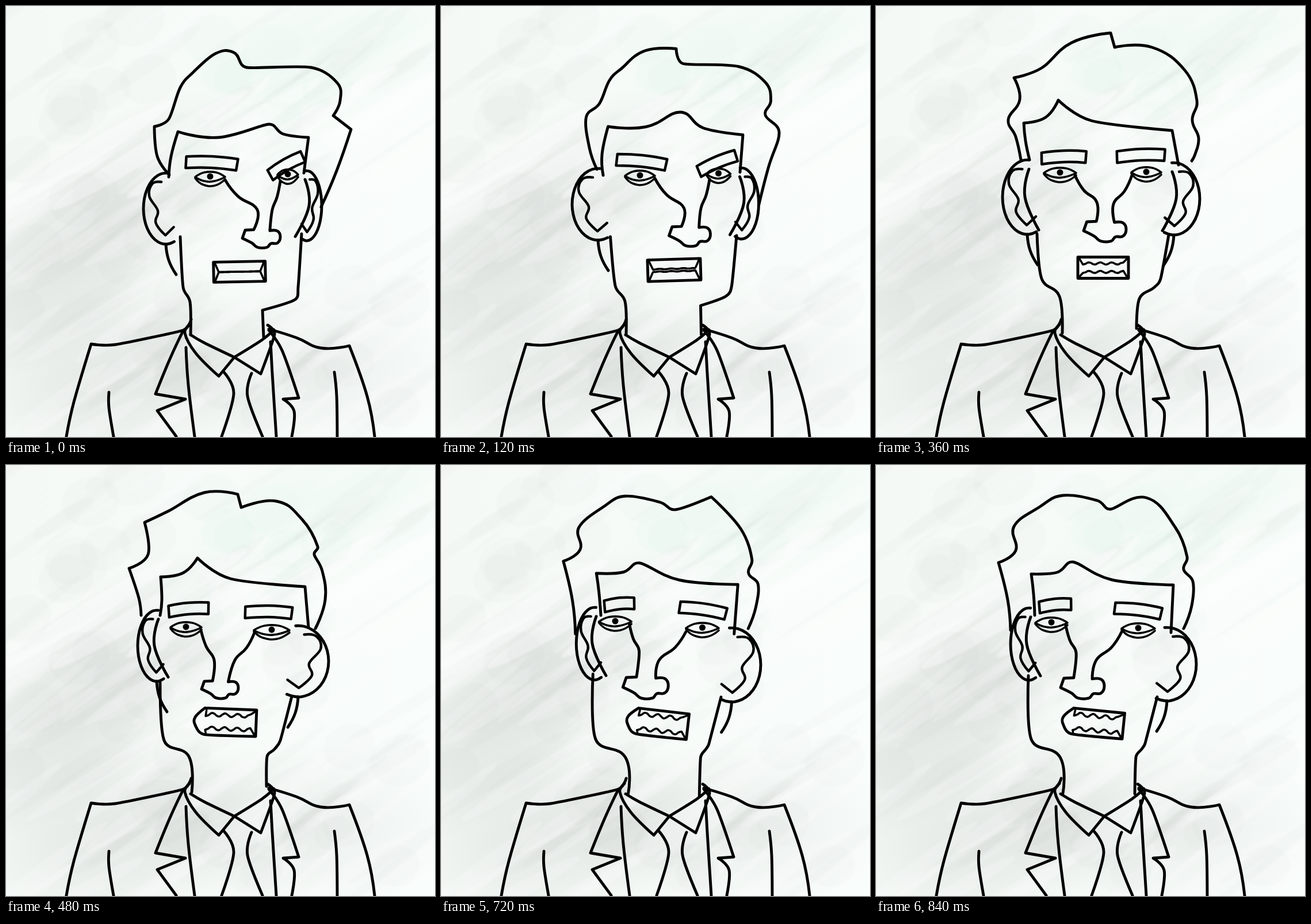
Animation of 746x751 px, one loop 960 ms. Source, as an HTML page with a canvas:

```html
<!DOCTYPE html>
<html lang="en">
<head>
<meta charset="utf-8">
<title>Talking head</title>
<style>
html, body { margin: 0; width: 100%; height: 100%; overflow: hidden; background: #f7faf8; }
canvas { display: block; }
</style>
</head>
<body>
<canvas id="stage" width="746" height="751"></canvas>
<script>
const W = 746, H = 751, STEP = 120;
const ctx = document.getElementById('stage').getContext('2d');

// Outlines are x, y key points. Features:
// ear [x, y, rx, ry], brow [x, y, width, tilt], eye [x, y, width],
// nose [x, y, half width], mouth [x, y, width, height, tilt, left bulge, teeth gap].
// Ears, cheeks and napes list the left side first.
const right = {
  hair: [284, 294, 263, 262, 258, 210, 283, 197, 303, 142, 325, 116, 364, 83, 396, 81, 418, 107, 530, 107, 576, 134, 581, 165, 569, 191, 600, 215, 575, 287, 548, 350],
  fringe: [283, 298, 287, 262, 299, 219, 370, 229, 457, 206, 482, 223, 526, 229, 518, 291],
  jawL: [303, 402, 308, 490, 320, 516, 321, 573],
  jawR: [514, 397, 508, 490, 502, 512, 446, 530, 448, 577],
  ears: [[278, 353, 39, 62], [523, 348, 26, 61]], cheeks: [0, 1], napes: [1, 0],
  brows: [[358, 274, 90, 0.06], [488, 278, 66, -0.5]],
  eyes: [[355, 298, 52], [490, 294, 36]],
  bridge: [381, 303, 437, 355, 463, 355, 477, 305], nose: [444, 403, 33],
  mouth: [406, 463, 90, 35, -0.02, 0, 0]
};
const front = {
  hair: [258, 275, 253, 232, 247, 177, 268, 143, 283, 117, 305, 100, 345, 73, 422, 68, 424, 94, 505, 104, 552, 132, 566, 165, 559, 189, 576, 225, 563, 278, 557, 345],
  fringe: [281, 292, 273, 255, 282, 201, 343, 192, 375, 164, 430, 202, 524, 220, 522, 288],
  jawL: [286, 402, 298, 485, 320, 514, 323, 570],
  jawR: [514, 403, 503, 485, 488, 500, 457, 514, 457, 568],
  ears: [[268, 338, 51, 63], [522, 340, 34, 63]], cheeks: [0, 1], napes: [1, 1],
  brows: [[340, 270, 84, 0.17], [474, 270, 76, -0.28]],
  eyes: [[337, 294, 52], [475, 291, 48]],
  bridge: [363, 298, 408, 349, 441, 350, 457, 299], nose: [421, 394, 39],
  mouth: [405, 457, 94, 40, -0.04, 0, 0.12]
};
const frontLeft = {
  hair: [252, 268, 243, 228, 230, 198, 250, 163, 240, 125, 288, 108, 340, 64, 408, 47, 415, 72, 480, 72, 537, 112, 558, 165, 550, 199, 561, 230, 555, 258, 549, 270],
  fringe: [267, 268, 260, 235, 257, 204, 295, 194, 317, 164, 375, 200, 515, 217, 526, 277],
  jawL: [280, 397, 288, 475, 319, 506, 324, 570],
  jawR: [509, 399, 495, 475, 483, 491, 458, 510, 453, 562],
  ears: [[263, 333, 43, 65], [518, 336, 45, 63]], cheeks: [1, 1], napes: [1, 1],
  brows: [[327, 264, 78, -0.02], [461, 261, 84, -0.03]],
  eyes: [[320, 291, 56], [470, 290, 52]],
  bridge: [346, 295, 384, 342, 413, 345, 445, 295], nose: [398, 390, 37],
  mouth: [395, 456, 88, 37, 0, 0, 0.2]
};
const left = {
  hair: [235, 262, 231, 232, 214, 180, 247, 156, 241, 100, 283, 80, 345, 48, 403, 51, 409, 74, 470, 63, 515, 95, 542, 142, 536, 156, 550, 185, 555, 235, 538, 285],
  fringe: [268, 262, 271, 235, 269, 195, 308, 188, 333, 162, 390, 198, 520, 212, 526, 283],
  jawL: [268, 378, 275, 480, 318, 508, 323, 570],
  jawR: [497, 403, 477, 480, 467, 495, 454, 508, 453, 560],
  ears: [[262, 315, 33, 62], [508, 342, 53, 62]], cheeks: [1, 0], napes: [1, 1],
  brows: [[318, 252, 70, -0.07], [457, 257, 82, 0.03]],
  eyes: [[313, 283, 54], [462, 288, 62]],
  bridge: [339, 288, 362, 340, 398, 340, 432, 292], nose: [372, 389, 32],
  mouth: [386, 448, 98, 46, 0.04, 8, 0.26]
};
const farLeft = {
  hair: [234, 288, 229, 235, 213, 170, 243, 149, 240, 107, 283, 74, 325, 53, 385, 62, 408, 77, 470, 57, 520, 108, 541, 160, 535, 182, 551, 203, 549, 245, 535, 285],
  fringe: [276, 262, 274, 225, 270, 190, 315, 187, 343, 169, 410, 200, 517, 209, 513, 292],
  jawL: [265, 367, 270, 478, 320, 509, 325, 572],
  jawR: [489, 404, 468, 485, 462, 495, 452, 509, 450, 573],
  ears: [[266, 312, 32, 63], [506, 347, 51, 64]], cheeks: [1, 0], napes: [0, 1],
  brows: [[312, 245, 56, -0.08], [456, 254, 82, 0.13]],
  eyes: [[305, 275, 56], [456, 285, 58]],
  bridge: [330, 280, 348, 327, 383, 340, 427, 291], nose: [359, 386, 38],
  mouth: [382, 450, 97, 45, 0.1, 8, 0.28]
};
const suit = [
  [105, 750, 118, 690, 148, 589, 190, 590, 308, 565, 322, 546],
  [641, 750, 628, 680, 597, 592, 548, 596, 505, 578, 457, 563],
  [179, 673, 179, 700, 187, 750],
  [571, 638, 575, 680, 576, 750],
  [308, 566, 285, 615, 260, 676, 312, 685, 263, 705, 296, 750],
  [457, 565, 480, 600, 509, 683, 482, 685, 501, 706, 497, 750],
  [313, 595, 317, 660, 328, 750],
  [460, 585, 463, 640, 470, 750],
  [319, 555, 311, 570, 330, 605, 370, 645, 397, 612, 345, 587, 321, 573],
  [455, 556, 467, 572, 443, 641, 397, 612, 445, 582, 466, 564],
  [378, 637, 396, 675, 375, 750],
  [427, 640, 420, 680, 446, 750]
];

const lerp = (a, b, k) => a + (b - a) * k;
const pairs = flat => Array.from({ length: flat.length / 2 }, (_, i) => flat.slice(2 * i, 2 * i + 2));

function blend(a, b, k) {
  if (typeof a === 'number') return lerp(a, b, k);
  if (Array.isArray(a)) return a.map((v, i) => blend(v, b[i], k));
  return Object.fromEntries(Object.keys(a).map(key => [key, blend(a[key], b[key], k)]));
}

// Smooth line through the points; sharp turns stay corners.
function stroke(pts, width = 4.9) {
  const tangents = pts.map(([x, y], i) => {
    const a = pts[i - 1], b = pts[i + 1];
    if (!a || !b) return [0, 0];
    const ux = x - a[0], uy = y - a[1], vx = b[0] - x, vy = b[1] - y;
    const u = Math.hypot(ux, uy), v = Math.hypot(vx, vy);
    if ((ux * vx + uy * vy) / (u * v) < 0.4) return [0, 0];
    const reach = Math.min(u, v) / (u + v) * 0.7;
    return [(ux + vx) * reach, (uy + vy) * reach];
  });
  ctx.beginPath();
  ctx.moveTo(...pts[0]);
  for (let i = 1; i < pts.length; i++) {
    const [p, q, s, t] = [pts[i - 1], pts[i], tangents[i - 1], tangents[i]];
    ctx.bezierCurveTo(p[0] + s[0] / 1.5, p[1] + s[1] / 1.5, q[0] - t[0] / 1.5, q[1] - t[1] / 1.5, ...q);
  }
  ctx.lineWidth = width;
  ctx.stroke();
}

// Maps local points into a turned, scaled frame.
const place = (x, y, sx, sy, tilt, pts) => {
  const c = Math.cos(tilt), s = Math.sin(tilt);
  return pts.map(([u, v]) => [x + u * sx * c - v * sy * s, y + u * sx * s + v * sy * c]);
};

function drawEar([x, y, rx, ry], side, cheek, nape) {
  const put = pts => place(x, y, side * rx, ry, 0, pts);
  const rim = Array.from({ length: 13 }, (_, i) => lerp(-1.65, 1.95, i / 12));
  stroke(put(rim.map(a => [Math.cos(a), Math.sin(a)])));
  stroke(put(pairs([0.2, -0.75, 0.6, -0.7, 0.74, -0.35, 0.36, 0.06, 0.45, 0.4, 0.02, 0.75, -0.35, 0.52])), 4.4);
  if (cheek) stroke([[x - side * 3, y - ry * 0.75], [x + side * 4, y], [x - side * 20, y + ry * 0.88]]);
  if (nape) stroke([[x, y + ry], [x - side * 5, y + ry + 28], [x - side * 18, y + ry + 53]]);
}

function drawBrow([x, y, width, tilt]) {
  stroke(place(x, y, width / 2, 10, tilt, pairs([-1, -0.9, 0, -1.2, 1, -1, 0.95, 1, 0, 0.8, -1, 1.1, -1, -0.9])), 4.5);
}

function drawEye([x, y, width]) {
  const r = width / 2;
  stroke([[x - r, y], [x - r * 0.4, y - 8], [x + r * 0.4, y - 8], [x + r, y], [x + r * 0.3, y + 7], [x - r * 0.4, y + 7], [x - r, y]], 3.6);
  stroke([[x - r, y + 2], [x - r * 0.5, y + 13], [x + r * 0.3, y + 15], [x + r, y + 4]], 3.6);
  ctx.beginPath();
  ctx.arc(x, y - 1, 5.5, 0, 7);
  ctx.fill();
}

function drawNose(bridge, [x, y, r]) {
  const [eyeL, topL, topR, eyeR] = pairs(bridge);
  const bend = (a, b) => [lerp(a[0], b[0], 0.4), lerp(a[1], b[1], 0.55)];
  const tip = pairs([-0.4, -0.4, -0.85, -0.38, -1, 0.05, -0.5, 0.3, -0.2, 0.53, 0.3, 0.53, 0.5, 0.33, 0.85, 0.3, 1, -0.02, 0.85, -0.33, 0.45, -0.35]);
  stroke([eyeL, bend(eyeL, topL), topL, ...place(x, y, r, r, 0, tip), topR, bend(eyeR, topR), eyeR]);
}

function drawMouth([x, y, width, height, tilt, bulge, gap]) {
  const put = pts => place(x, y, width, height, tilt, pts);
  const b = bulge / width;
  stroke(put([[-0.5 + b, -0.5], [0.5, -0.5], [0.5, 0.5], [-0.5 + b, 0.5], [-0.5 - b, 0.15], [-0.5 - b, -0.15], [-0.5 + b, -0.5]]));
  for (const row of [-1, 1]) {
    const teeth = Array.from({ length: 17 }, (_, i) => {
      const u = lerp(-0.4, 0.4, i / 16);
      return [u, row * gap + Math.sin(u * 28) * gap * 0.25];
    });
    stroke(put([[-0.47 + b, row * 0.43], ...teeth, [0.47, row * 0.43]]), 3.6);
  }
}

function drawHead(pose) {
  for (const outline of ['hair', 'fringe', 'jawL', 'jawR']) stroke(pairs(pose[outline]));
  pose.ears.forEach((ear, i) => drawEar(ear, i ? 1 : -1, pose.cheeks[i] > 0.5, pose.napes[i] > 0.5));
  pose.brows.forEach(drawBrow);
  pose.eyes.forEach(drawEye);
  drawNose(pose.bridge, pose.nose);
  drawMouth(pose.mouth);
}

function paintBackdrop() {
  const canvas = document.createElement('canvas');
  canvas.width = W; canvas.height = H;
  const g = canvas.getContext('2d');
  let seed = 11;
  const rnd = (a, b) => lerp(a, b, (seed = seed * 16807 % 2147483647) / 2147483647);
  const grey = a => `rgba(120,126,122,${a})`;
  const green = a => `rgba(165,222,190,${a})`;
  const white = a => `rgba(255,255,255,${a})`;

  const base = g.createLinearGradient(0, 0, W, 0);
  base.addColorStop(0, '#f4f9f6');
  base.addColorStop(1, '#f9fdfb');
  g.fillStyle = base;
  g.fillRect(0, 0, W, H);

  const wash = (x, y, rx, ry, turn, tint, alpha) => {
    g.save();
    g.translate(x, y); g.rotate(turn); g.scale(rx, ry);
    const fade = g.createRadialGradient(0, 0, 0, 0, 0, 1);
    fade.addColorStop(0, tint(alpha));
    fade.addColorStop(0.5, tint(alpha * 0.6));
    fade.addColorStop(1, tint(0));
    g.fillStyle = fade;
    g.fillRect(-1, -1, 2, 2);
    g.restore();
  };
  wash(150, 400, 340, 150, -0.75, grey, 0.18);
  wash(200, 640, 260, 160, -0.2, grey, 0.15);
  wash(500, 630, 300, 150, 0, grey, 0.09);
  wash(580, 80, 300, 130, -0.3, green, 0.1);

  const dab = (x, y, length, width, turn, style) => {
    g.fillStyle = style;
    g.beginPath();
    g.ellipse(x, y, length / 2, width / 2, turn, 0, 7);
    g.fill();
  };
  g.filter = 'blur(1.5px)';
  for (let i = 0; i < 120; i++) {
    const tint = i % 2 ? white : grey;
    dab(rnd(0, W), rnd(0, H), rnd(100, 340), rnd(8, 32), rnd(-0.7, -0.5), tint(i % 2 ? 0.2 : 0.018));
  }
  for (let i = 0; i < 5; i++) dab(120 + i * 130, 270 - i * 20, 400, 34, -0.55, white(0.4));
  for (let i = 0; i < 45; i++) {
    const x = rnd(0, 700), y = rnd(20, 730), size = rnd(70, 115);
    dab(x, y, size, size * 0.85, -0.3, y < 280 && x > 300 ? green(0.04) : grey(0.018));
  }
  return canvas;
}

const poses = [
  right, blend(right, front, 0.5), front, frontLeft, left,
  farLeft, blend(farLeft, left, -0.25), farLeft
];
const backdrop = paintBackdrop();
ctx.lineCap = ctx.lineJoin = 'round';

function draw() {
  ctx.drawImage(backdrop, 0, 0);
  suit.forEach(points => stroke(pairs(points)));
  drawHead(poses[Math.floor(performance.now() / STEP) % poses.length]);
  requestAnimationFrame(draw);
}
draw();
</script>
</body>
</html>
```
